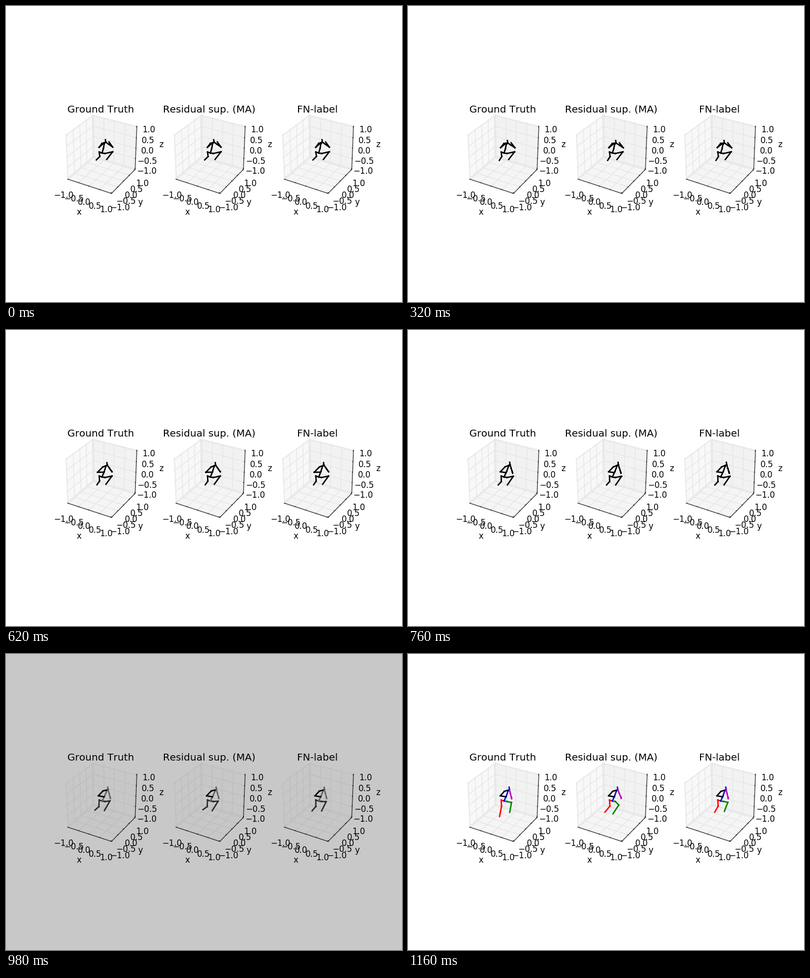
A matplotlib script for the animation above (1.18 s loop, 800x600 px).

```python
import math

import numpy as np
import matplotlib.pyplot as plt
from matplotlib.animation import FuncAnimation
from matplotlib.patches import Polygon

plt.rcParams.update({"font.family": "DejaVu Sans", "font.size": 12,
                     "text.kerning_factor": 6})

W, H, DPI = 800, 600, 100
FRAMES, INTERVAL = 59, 20
FORECAST = 49                      # first predicted pose; also a grey flash
TITLES = ["Ground Truth", "Residual sup. (MA)", "FN-label"]

# Three square panels in a row
SIDE = 620 / 3.4
STEP = SIDE * 1.2
LEFT, TOP = 100, (H - SIDE) / 2
SCALE = SIDE / 0.185
CX, CY = LEFT + 0.095 * SCALE, TOP + 0.09 * SCALE

# Camera
DIST, ELEV, AZIM = 10, math.radians(30), math.radians(-60)
TOWARD = np.array([math.cos(ELEV) * math.cos(AZIM),
                   math.cos(ELEV) * math.sin(AZIM), math.sin(ELEV)])
RIGHT = np.array([-math.sin(AZIM), math.cos(AZIM), 0])
UP = np.cross(TOWARD, RIGHT)

# Box of the 3D axes, in data units
LO, HI = -1 - 1 / 24, 1 + 1 / 24
TICKS = np.linspace(-1, 1, 5)
DELTA = 1 / 6
POINT = 48 / (2 * 72 * SIDE / DPI) * DELTA
TICK_PAD, LABEL_PAD = 12 * POINT, 26 * POINT

# Body joints as screen points x + yj of the first panel, y down
PELVIS, HIP_A, HIP_B = 194 + 298j, 188.3 + 296j, 200 + 299j
# Each joint's place at the start and at the end of the observed part
MOVES = {
    "knee_a": (189.5 + 305j, 187.5 + 309.5j),
    "ankle_a": (182.5 + 312j, 179 + 315j),
    "knee_b": (215.5 + 295.5j, 210 + 297.5j),
    "ankle_b": (203.5 + 311j, 198 + 317j),
    "neck": (201.5 + 276j, 206.5 + 275j),
    "shoulder_l": (194 + 278.5j, 196 + 277.5j),
    "elbow_l": (188 + 286.5j, 186.5 + 287.5j),
    "wrist_l": (197 + 278.5j, 198 + 289.5j),
    "elbow_r": (215.5 + 286j, 211 + 292.5j),
    "wrist_r": (208 + 275.5j, 210.5 + 289j),
}
LEGS = ("knee_a", "ankle_a", "knee_b", "ankle_b")
# Where the joints of each panel end: ankle_a, knee_b, ankle_b, elbow_r
ENDINGS = [
    (185 + 329.5j, 209 + 301j, 205.5 + 321j, 209.3 + 293j),
    (179 + 320.5j, 207 + 306j, 195.3 + 324j, 212 + 292.5j),
    (182 + 320.5j, 208.5 + 300.5j, 201.5 + 319j, 209.3 + 293j),
]
HEAD_STARTS = [0, 0, 0.55]         # share of the way jumped at once

COLORS = ["r", "g", "b", "k", (0.75, 0, 0.75)]
FLASH_COLORS = ["#2a2a2a", "#2a2a2a", "#606060", "k", "#686868"]
PANE_GREYS = [0.95, 0.90, 0.925]


def project(pts):
    """Data points to screen pixels of the first panel."""
    p = np.atleast_2d(np.asarray(pts, float)) / 2
    depth = DIST - p @ TOWARD
    return np.column_stack([CX + SCALE * (p @ RIGHT) / depth,
                            CY - SCALE * (p @ UP) / depth])


def draw_line(pts, dx, cap="projecting", **style):
    xy = project(pts)
    return ax.plot(xy[:, 0] + dx, xy[:, 1], solid_capstyle=cap, **style)[0]


def draw_text(pos, text, dx, va):
    x, y = project(pos)[0]
    ax.text(x + dx, y, text, ha="center", va=va)


def draw_panes(dx):
    corners = [(LO, LO), (HI, LO), (HI, HI), (LO, HI)]
    for axis, side in enumerate([LO, HI, LO]):
        quad = project([np.insert(c, axis, side) for c in corners])
        panes.append(ax.add_patch(Polygon(quad + [dx, 0], lw=1, zorder=1)))


def grid_path(axis, t):
    """Grid line of one tick, bent across the two panes it crosses."""
    if axis == 0:
        return [(t, LO, LO), (t, HI, LO), (t, HI, HI)]
    if axis == 1:
        return [(HI, t, LO), (LO, t, LO), (LO, t, HI)]
    return [(LO, LO, t), (LO, HI, t), (HI, HI, t)]


def draw_axis(axis, name, dx):
    edge = np.array([[0, LO, LO], [HI, 0, LO], [HI, HI, 0]][axis])
    outward = np.sign(edge)
    unit = np.eye(3)[axis]
    tick_dir = -np.eye(3)[1] if axis == 0 else np.eye(3)[0]

    draw_line([edge + unit * LO, edge + unit * HI], dx,
              color="k", lw=0.75, zorder=3)
    draw_text(edge + outward * LABEL_PAD, name, dx, "center")
    for t in TICKS:
        grid.append(draw_line(grid_path(axis, t), dx, lw=1, zorder=2))
        spot = edge + unit * t
        draw_line([spot - 0.2 * DELTA * tick_dir,
                   spot + 0.1 * DELTA * tick_dir], dx, cap="butt",
                  color="k", lw=0.8, zorder=3)
        label = f"{t:.1f}".replace("-", "\u2212")
        draw_text(spot + outward * TICK_PAD, label, dx, "top")


def smoothstep(x):
    x = min(max(x, 0), 1)
    return x * x * (3 - 2 * x)


def pose(frame, panel):
    t = min(frame / (FORECAST - 1), 1)
    turn = smoothstep((frame - 16) / 26)
    joints = {}
    for name, (start, end) in MOVES.items():
        share = t ** 3 if name in LEGS else turn
        joints[name] = start + share * (end - start)

    # The foot arcs, the upper body bobs once, both arms swing out
    joints["ankle_a"] += (2.5 + 1j) * math.sin(math.pi * t)
    bob = 2j * math.sin(2 * math.pi * t)
    for name in ("neck", "elbow_r", "wrist_r"):
        joints[name] += bob
    swing = math.exp(-((frame - 25) / 7) ** 2)
    joints["elbow_l"] += (-4.5 + 2.7j) * swing
    joints["wrist_l"] += (-4 + 6j) * swing
    joints["elbow_r"] += (3 - 2j) * swing
    joints["wrist_r"] += 1.5 * swing

    if frame >= FORECAST:
        go = (frame - FORECAST + 1) / (FRAMES - FORECAST)
        go = max(go, HEAD_STARTS[panel])
        joints["neck"] -= 1.5 * go
        joints["shoulder_l"] += (-1.5 + 1j) * go
        joints["knee_a"] += (1.5 - 1j) * go
        for name, end in zip(("ankle_a", "knee_b", "ankle_b", "elbow_r"),
                             ENDINGS[panel]):
            joints[name] += go * (end - joints[name])
        joints["wrist_r"] = joints["elbow_r"] - 0.5 - 3j
    return joints


def limbs(j):
    neck = j["neck"]
    chest = neck - 3 + 3j
    belly = (PELVIS + chest) / 2 + 0.6
    shoulder_r = neck + 0.42 * (j["elbow_r"] - neck)
    return [
        [PELVIS, HIP_A, j["knee_a"], j["ankle_a"]],
        [PELVIS, HIP_B, j["knee_b"], j["ankle_b"]],
        [PELVIS, belly, chest, neck, neck - 0.7 - 5j],
        [neck, j["shoulder_l"], j["elbow_l"], j["wrist_l"]],
        [neck, shoulder_r, j["elbow_r"], j["wrist_r"]],
    ]


def separate(path):
    """Split a path into single bones so that each gets its own caps."""
    gap = complex(np.nan, np.nan)
    return np.array([p for a, b in zip(path, path[1:]) for p in (a, b, gap)])


def update(frame):
    flash = frame == FORECAST
    ax.set_facecolor("#c8c8c8" if flash else "w")
    for i, pane in enumerate(panes):
        grey = PANE_GREYS[i % 3]
        pane.set_color("#c7c7c7" if flash else (grey, grey, grey, 0.5))
    for line in grid:
        line.set_color("#bdbdbd" if flash else "#e6e6e6")

    colors = FLASH_COLORS if flash else COLORS
    for panel, bones in enumerate(bodies):
        paths = limbs(pose(frame, panel))
        for line, path, color in zip(bones, paths, colors):
            z = separate(path)
            line.set_data(z.real + panel * STEP, z.imag)
            line.set_color(color if frame >= FORECAST else "k")
    return []


fig = plt.figure(figsize=(W / DPI, H / DPI), dpi=DPI, facecolor="w")
ax = fig.add_axes([0, 0, 1, 1])
ax.set(xlim=(0, W), ylim=(H, 0), xticks=[], yticks=[], autoscale_on=False)
ax.spines[:].set_visible(False)

panes, grid, bodies = [], [], []
for panel, title in enumerate(TITLES):
    dx = panel * STEP
    draw_panes(dx)
    for axis, name in enumerate("xyz"):
        draw_axis(axis, name, dx)
    # The small nudge keeps the middle title off a rounding tie
    ax.text(LEFT + SIDE / 2 + dx + 0.05, TOP + 0.08 * SIDE - 5 * DPI / 72,
            title, size=14.4, ha="center", va="baseline")
    bodies.append([ax.plot([], [], lw=2, zorder=4,
                           solid_capstyle="projecting")[0] for _ in COLORS])

anim = FuncAnimation(fig, update, frames=FRAMES, interval=INTERVAL,
                     repeat=True, repeat_delay=0, blit=False)
plt.show()
```
